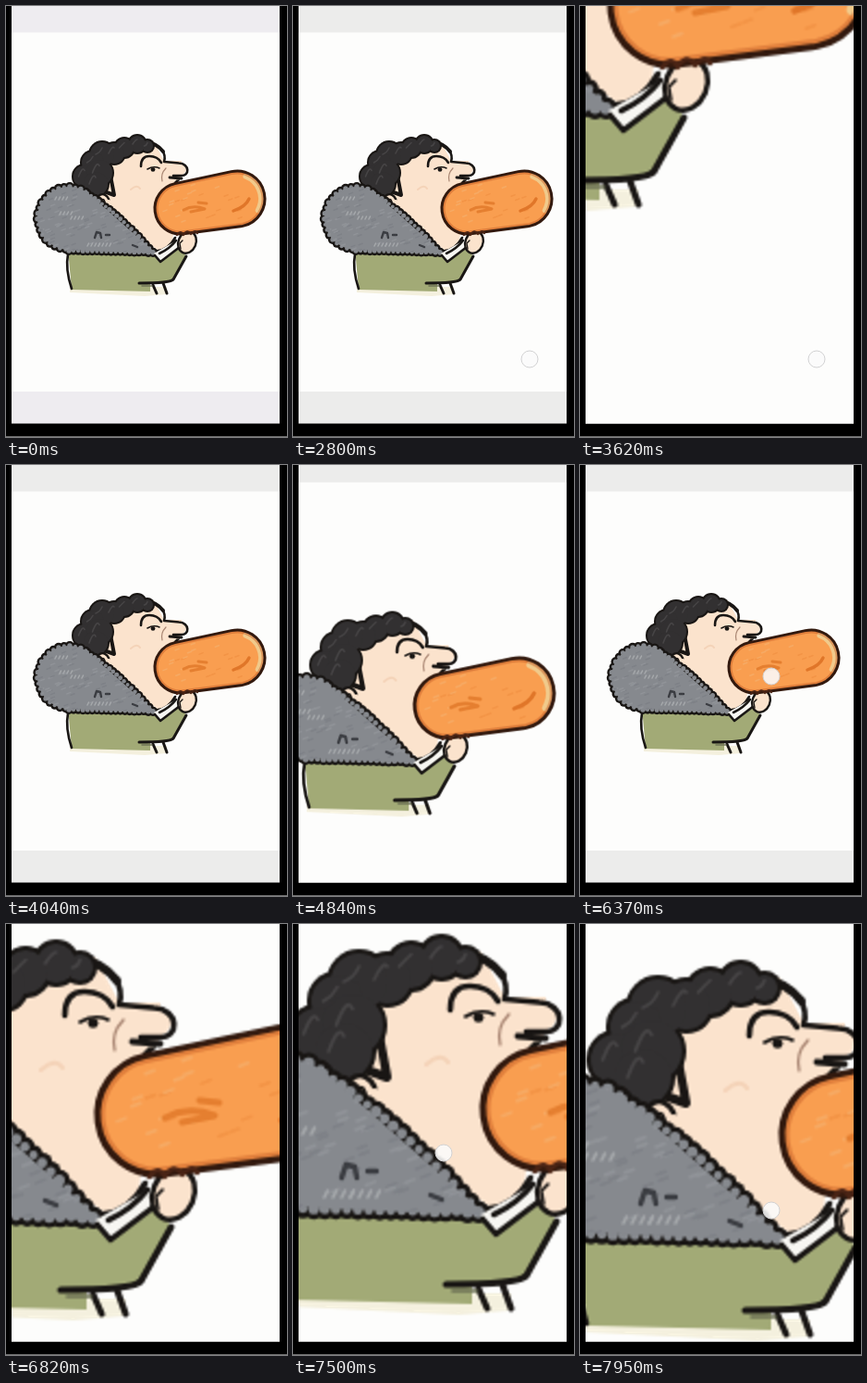
An HTML page with a canvas for the animation above (8000 ms loop, 304 px wide and 465 px high).

```html
<!DOCTYPE html>
<html lang="en">
<head>
<meta charset="utf-8">
<title>Pinch and pan</title>
<style>
html, body { margin: 0; width: 100%; height: 100%; overflow: hidden; background: #000; }
canvas { display: block; width: 304px; height: 465px; }
</style>
</head>
<body>
<canvas id="stage" width="304" height="465"></canvas>
<script>
const W = 304, H = 465, LOOP = 8000, MAX_ZOOM = 2.35;
const INK = '#191614', SKIN = '#fbe3cd', FUR = '#86898e', GREEN = '#a2aa76';
const { PI, sin, cos } = Math;
const ctx = document.getElementById('stage').getContext('2d');

// Each burst of movement is sampled at a low frame rate from its own start.
const BURSTS = [0, 2800, 3500, 4570, 6250, 7220];
const FRAME = 135, TOUCH_TIME = 270, DRAG_START = 7220;

// Double taps zoom in and out around the tapped point.
const ZOOMS = [
  { x: 256, y: 381, zoomIn: 2893, zoomOut: 3620, end: 4040, touches: [2800, 3500] },
  { x: 271, y: 65, zoomIn: 4760, zoomOut: 5348, end: 5720, touches: [] },
  { x: 207, y: 228, zoomIn: 6440, zoomOut: LOOP, end: LOOP, touches: [6250] }
];

const clamp = u => Math.min(1, Math.max(0, u));
const ease = u => clamp(u) ** 2 * (3 - 2 * clamp(u));

function seeded(seed) {
  return () => (seed = (seed * 16807) % 2147483647) / 2147483647;
}

function makeArtwork() {
  const art = document.createElement('canvas');
  art.width = W;
  art.height = H;
  const g = art.getContext('2d');
  g.lineCap = g.lineJoin = 'round';

  function paint(path, color, width = 0, ink = INK) {
    if (color) {
      g.fillStyle = color;
      g.fill(path);
    }
    if (width) {
      g.lineWidth = width;
      g.strokeStyle = ink;
      g.stroke(path);
    }
  }

  const line = (d, width = 2.6, ink = INK) => paint(new Path2D(d), null, width, ink);
  const shape = (d, color) => paint(new Path2D(d), color);

  function ellipse(x, y, rx, ry, turn = 0) {
    const path = new Path2D();
    path.ellipse(x, y, rx, ry, turn, 0, 2 * PI);
    return path;
  }

  // Merges discs into one outlined lump.
  function puffs(discs, color, width) {
    for (const [x, y, r] of discs) paint(ellipse(x, y, r + width / 2, r + width / 2), INK);
    for (const [x, y, r] of discs) paint(ellipse(x, y, r - width / 2, r - width / 2), color);
  }

  // Outline around two discs; a zero radius makes a point.
  function hull(x1, y1, r1, x2, y2, r2) {
    const lean = Math.atan2(y2 - y1, x2 - x1);
    const open = Math.acos((r1 - r2) / Math.hypot(x2 - x1, y2 - y1));
    const path = new Path2D();
    path.arc(x1, y1, r1, lean + open, lean - open + 2 * PI);
    path.arc(x2, y2, r2, lean - open, lean + open);
    path.closePath();
    return path;
  }

  function flecks(path, seed, count, [x, y, w, h], colors) {
    const random = seeded(seed);
    g.save();
    g.clip(path);
    for (let i = 0; i < count; i++) {
      const px = x + random() * w, py = y + random() * h;
      line(`M${px} ${py}l4 -1.5`, 1.5, colors[i % colors.length]);
    }
    g.restore();
  }

  function jacket() {
    shape('M69 303H174V311L150 313 69 309Z', '#f4f0de');
    shape('M67 262H155L166 276 188 260 195 270 179 297 156 300V308L71 306Z', GREEN);
    line('M67 268Q64 284 71 305');
    line('M195 270L181 295Q178 299 144 299', 3);
    line('M159 301L163 310M170 299L174 310', 3);
    line('M147 302H158', 1.5, '#6f7355');
  }

  function head() {
    shape('M118 158L160 146 171 167H190V183L186 190 180 256 168 266 98 216Z', SKIN);
    paint(ellipse(188, 176, 7, 6.5), SKIN);
    line('M169 156Q173 161 171 168L187 169.5C199 170 199 184 189 183L181 183');
    line('M177 185L190 186M187 187L183 191', 2.8);
    line('M146 173Q146 162 155 162T168 169');
    line('M153 176Q160 172 166 175', 1.6);
    paint(ellipse(159, 176.5, 2.4, 2.2), INK);
    line('M173 175Q167 181 169 189', 1.2, '#a98673');
    line('M135 198Q142 192 145 197', 2, '#f4d3b8');
    line('M160 264Q174 266 183 250');
  }

  function hair() {
    const curls = [[153, 151, 7], [142, 149, 10], [128, 153, 11], [117, 159, 12],
      [104, 160, 14], [94, 169, 13], [85, 184, 13], [101, 180, 15], [97, 192, 14]];
    line('M152 147Q163 148 170 157', 4);
    line('M112 178L117 204L106 200', 4);
    puffs(curls, '#323031', 2);
    const random = seeded(19);
    for (const [x, y, r] of curls) {
      line(`M${x - r / 2} ${y}q${r / 3} ${-r * random()} ${r / 2} ${-r / 2}`, 1.6, '#464445');
    }
    paint(ellipse(105, 210.5, 6.5, 7.5, -0.4), SKIN, 2.4);
    paint(ellipse(111, 214, 4, 5), SKIN);
    line('M103 209Q107 207 107 213', 1.4);
  }

  function furCollar() {
    const random = seeded(31);
    const body = hull(68, 229, 34, 160, 266, 1);
    const rim = [];
    const addPuff = (x, y) => rim.push([x, y, 3 + random()]);
    for (let a = 1.5; a < 5.4; a += 0.18) addPuff(68 + 34 * cos(a), 229 + 34 * sin(a));
    for (let u = 0; u <= 1; u += 0.055) {
      addPuff(88 + 72 * u, 202 + 64 * u - 4 * sin(u * PI));
      addPuff(68 + 92 * u, 264 + 2 * u);
    }
    puffs(rim, FUR, 2.4);
    paint(body, FUR);
    flecks(body, 77, 150, [34, 195, 125, 72], ['#909398', '#7e8187']);
    for (const [x, y] of [[53, 209], [58, 225], [70, 230], [88, 259], [100, 259]]) {
      for (let k = 0; k < 4; k++) line(`M${x + k * 4} ${y}l1.5 -3`, 1.5, '#a5a8ab');
    }
    line('M96 250L98 244 102 245 103 250M108 247H112M137 258L142 260', 2.4, '#3b3d42');
  }

  function hand() {
    shape('M160 267L188 251 190 260 167 276Z', '#f7f6f2');
    line('M161 269L167 276 188 260M166 267Q177 262 184 253');
    paint(ellipse(196, 255, 9.5, 12, 0.4), SKIN, 2.4);
    line('M189 262L188 256 191 253', 1.4);
  }

  function bread() {
    const loaf = hull(188.5, 218.5, 27.5, 250, 208, 30);
    paint(loaf, '#f99e50');
    flecks(loaf, 5, 26, [170, 192, 85, 45], ['#f6aa64', '#f39446']);
    const shine = new Path2D();
    shine.arc(250, 208, 26, -1.2, 0.5);
    paint(shine, null, 6, '#f1ca8b');
    g.save();
    g.clip(loaf);
    paint(loaf, null, 7, 'rgba(190, 88, 34, 0.45)');
    g.restore();
    line('M192 220Q203 214 215 219L200 222M208 212L217 213', 3, '#e57f30');
    line('M246 221Q259 217 263 208', 3.4, '#e07629');
    paint(loaf, null, 3, '#32190e');
    line('M185 247q4 -6 7 0q4 -7 8 -1q4 -5 7 -1', 2.2, '#4a2415');
  }

  [jacket, head, hair, furCollar, hand, bread].forEach(part => part());

  const soft = document.createElement('canvas');
  soft.width = W;
  soft.height = H;
  const softCtx = soft.getContext('2d');
  softCtx.filter = 'blur(0.6px)';
  softCtx.drawImage(art, 0, 0);
  return soft;
}

const artwork = makeArtwork();

// The finger slides right, then pulls the picture down.
function dragAt(t) {
  const right = clamp((t - 7180) / 310), down = clamp((t - 7490) / 405);
  return {
    finger: { x: 60 + 103 * right + 44 * down, y: 250 - 3 * right + 62 * down },
    x: 106.5 * right + 13 * down,
    y: 28 * down - 6 * right
  };
}

function viewAt(t) {
  const zoom = ZOOMS.find(z => t < z.end);
  const amount = ease((t - zoom.zoomIn) / 280) - ease((t - zoom.zoomOut) / 300);
  const scale = 1 + (MAX_ZOOM - 1) * amount;
  const drag = t < DRAG_START ? { x: 0, y: 0 } : dragAt(t);
  return { scale, x: zoom.x * (1 - scale) + drag.x, y: zoom.y * (1 - scale) + drag.y };
}

function drawFinger({ x, y }) {
  ctx.beginPath();
  ctx.arc(x, y, 9, 0, 2 * PI);
  ctx.fillStyle = 'rgba(250, 250, 250, 0.88)';
  ctx.fill();
  ctx.lineWidth = 1;
  ctx.strokeStyle = '#d2d2d3';
  ctx.stroke();
}

function draw(t) {
  ctx.fillStyle = '#000';
  ctx.fillRect(0, 0, W, H);
  ctx.fillStyle = '#6c6c6c';
  ctx.fillRect(0, H - 1, W, 1);

  ctx.save();
  ctx.beginPath();
  ctx.rect(6, 0, 290, 450.5);
  ctx.clip();
  ctx.fillStyle = t < 2800 ? '#eeecf0' : '#ececeb';
  ctx.fillRect(0, 0, W, H);
  const view = viewAt(t);
  ctx.translate(view.x, view.y);
  ctx.scale(view.scale, view.scale);
  ctx.fillStyle = '#fdfdfc';
  ctx.fillRect(0, 28.5, W, 387.5);
  ctx.imageSmoothingQuality = 'high';
  ctx.drawImage(artwork, 0, 0);
  ctx.restore();

  const touched = ZOOMS.find(z => z.touches.some(at => t >= at && t < at + TOUCH_TIME));
  if (touched) drawFinger(touched);
  if (t >= DRAG_START) drawFinger(dragAt(t).finger);
}

const start = performance.now();
function tick() {
  const t = (performance.now() - start) % LOOP;
  const burst = BURSTS.findLast(at => at <= t) ?? 0;
  draw(burst + Math.floor((t - burst) / FRAME) * FRAME);
  requestAnimationFrame(tick);
}
tick();
</script>
</body>
</html>
```
